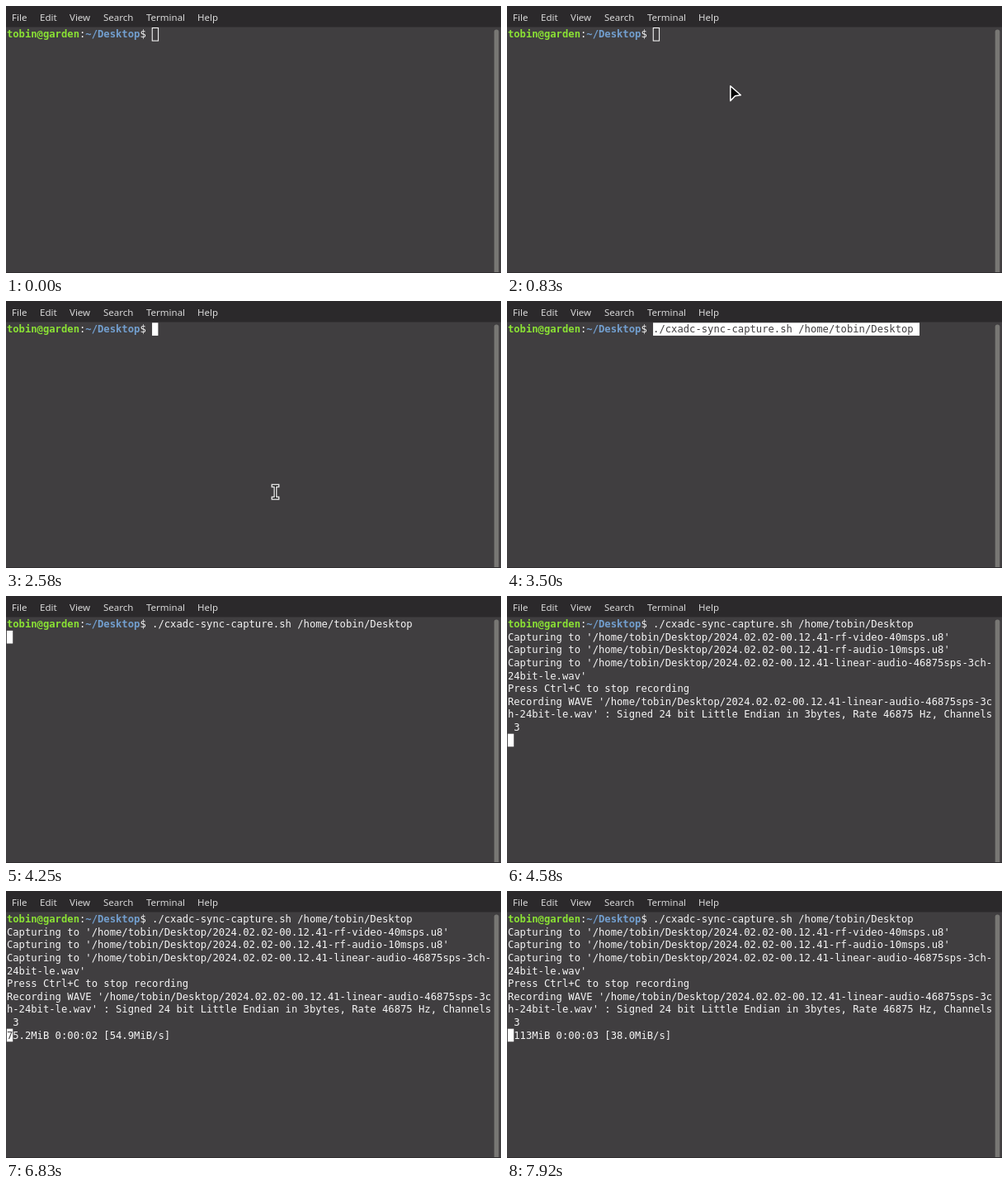
Write an HTML page with a canvas that moves like this. It is 600 px wide and 323 px high and loops after 8 s.

```html
<!DOCTYPE html>
<html lang="en">
<head>
<meta charset="utf-8">
<title>Terminal capture</title>
<style>
  html, body { margin: 0; width: 600px; height: 323px; overflow: hidden; background: #403e40; }
  canvas { display: block; }
</style>
</head>
<body>
<canvas id="stage" width="600" height="323"></canvas>
<script>
const ctx = document.getElementById('stage').getContext('2d');
const LOOP = 8000;
const BG = '#403e40', FG = '#f4f4f4', GREEN = '#8ae234', BLUE = '#729fcf';

// Terminal grid: 8 x 17 cells drawn at a reduced scale.
const CELL_W = 8, CELL_H = 17, ASCENT = 13, SCALE = 0.9175;
const ORIGIN = { x: 0.9, y: 26.3 };

const USER = 'tobin', HOST = 'garden';
const HOME = `/home/${USER}/Desktop`;
const COMMAND = `./cxadc-sync-capture.sh ${HOME}`;
const STAMP = `${HOME}/2024.02.02-00.12.41`;
const PROMPT_LEN = `${USER}@${HOST}:~/Desktop$ `.length;
const OUTPUT = [
  `Capturing to '${STAMP}-rf-video-40msps.u8'`,
  `Capturing to '${STAMP}-rf-audio-10msps.u8'`,
  `Capturing to '${STAMP}-linear-audio-46875sps-3ch-`,
  "24bit-le.wav'",
  'Press Ctrl+C to stop recording',
  `Recording WAVE '${STAMP}-linear-audio-46875sps-3c`,
  "h-24bit-le.wav' : Signed 24 bit Little Endian in 3bytes, Rate 46875 Hz, Channels",
  ' 3'
];
const MENU = [['File', 7], ['Edit', 41], ['View', 77], ['Search', 118], ['Terminal', 170], ['Help', 232]];

const FOCUS = 2580, PASTE = 2920, ENTER = 3920, START = 4580;

const PROGRESS = [
  { at: 0, text: '' },
  { at: 5580, text: '20.3MiB 0:00:01 [20.3MiB/s]' },
  { at: 6580, text: '75.2MiB 0:00:02 [54.9MiB/s]' },
  { at: 7580, text: ' 113MiB 0:00:03 [38.0MiB/s]' }
];

const POINTER = [
  { at: 0 },
  { at: 500, shape: arrow, x: 491, y: 281 },
  { at: 580, shape: arrow, x: 270, y: 96 },
  { at: 1000, shape: arrow, x: 277, y: 103 },
  { at: 1500, shape: arrow, x: 286, y: 114 },
  { at: 2000, shape: arrow, x: 327, y: 231 },
  { at: FOCUS, shape: iBeam, x: 326.5, y: 231 },
  { at: 3330 }
];

const current = (steps, t) => steps.filter(step => step.at <= t).pop();

function rect(color, x, y, w, h) {
  ctx.fillStyle = color;
  ctx.fillRect(x, y, w, h);
}

function write(text, col, row, color = FG, bold = false) {
  ctx.font = `${bold ? 'bold ' : ''}13.3px "DejaVu Sans Mono", monospace`;
  ctx.fillStyle = color;
  [...text].forEach((ch, i) => {
    if (ch !== ' ') ctx.fillText(ch, (col + i) * CELL_W, row * CELL_H + ASCENT);
  });
}

function block(col, row, count = 1) {
  rect('#fff', col * CELL_W, row * CELL_H, count * CELL_W, CELL_H);
}

function drawWindow() {
  rect(BG, 0, 0, 600, 323);
  rect('#2b292b', 0, 0, 600, 25.5);
  ctx.font = '11.5px "Noto Sans", "Open Sans", sans-serif';
  ctx.fillStyle = '#d8d8d8';
  for (const [label, x] of MENU) ctx.fillText(label, x, 17.5);
  ctx.fillStyle = '#787774';
  ctx.beginPath();
  ctx.roundRect(591.7, 28.5, 5.6, 300, 2.8);
  ctx.fill();
  rect('#302e30', 0, 322, 600, 1);
}

function drawPrompt() {
  const user = `${USER}@${HOST}`;
  write(user, 0, 0, GREEN, true);
  write(':', user.length, 0);
  write('~/Desktop', user.length + 1, 0, BLUE, true);
  write('$', PROMPT_LEN - 2, 0);
}

function drawTerminal(t) {
  ctx.save();
  ctx.transform(SCALE, 0, 0, SCALE, ORIGIN.x, ORIGIN.y);
  drawPrompt();
  if (t < FOCUS) {
    ctx.strokeStyle = '#fff';
    ctx.lineWidth = 1.1;
    ctx.strokeRect(PROMPT_LEN * CELL_W + 0.2, 0.2, CELL_W, CELL_H);
  } else if (t < PASTE) {
    block(PROMPT_LEN, 0);
  } else if (t < ENTER) {
    block(PROMPT_LEN, 0, COMMAND.length + 1);
    write(COMMAND, PROMPT_LEN, 0, BG);
  } else {
    write(COMMAND, PROMPT_LEN, 0);
    if (t < START) block(0, 1);
    else drawRecording(t);
  }
  ctx.restore();
}

function drawRecording(t) {
  const row = OUTPUT.length + 1;
  const { text } = current(PROGRESS, t);
  OUTPUT.forEach((line, i) => write(line, 0, i + 1));
  block(0, row);
  write(text.slice(0, 1), 0, row, BG);
  write(text.slice(1), 1, row);
}

function arrow() {
  ctx.beginPath();
  ctx.moveTo(0.8, 0.8);
  ctx.lineTo(13.3, 11.8);
  ctx.lineTo(6.6, 12.8);
  ctx.lineTo(0.8, 18.6);
  ctx.closePath();
  ctx.lineJoin = 'round';
  ctx.lineWidth = 1.5;
  ctx.strokeStyle = '#fff';
  ctx.fillStyle = '#050505';
  ctx.fill();
  ctx.stroke();
}

function iBeam() {
  ctx.beginPath();
  for (const y of [-7.5, 7.5]) {
    ctx.moveTo(-3, y);
    ctx.lineTo(3, y);
  }
  ctx.moveTo(0, -7.5);
  ctx.lineTo(0, 7.5);
  ctx.lineCap = 'square';
  for (const [color, width] of [['#fff', 3.8], ['#111', 1.4]]) {
    ctx.strokeStyle = color;
    ctx.lineWidth = width;
    ctx.stroke();
  }
}

function drawPointer(t) {
  const { shape, x, y } = current(POINTER, t);
  if (!shape) return;
  ctx.save();
  ctx.translate(x, y);
  shape();
  ctx.restore();
}

function frame() {
  const t = performance.now() % LOOP;
  drawWindow();
  drawTerminal(t);
  drawPointer(t);
  requestAnimationFrame(frame);
}
frame();
</script>
</body>
</html>
```
